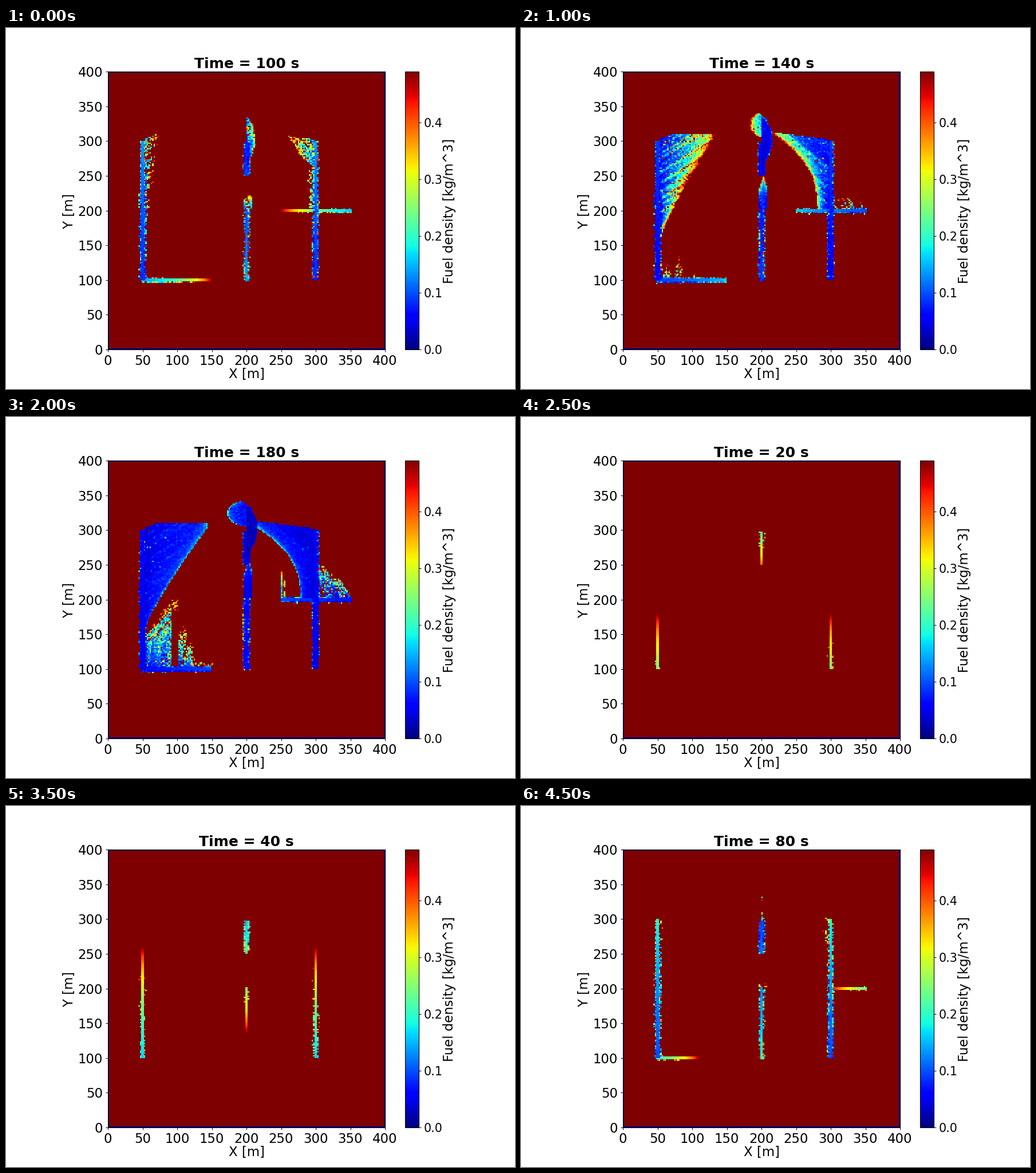
Animation, 889 px wide and 630 px high, one loop 5 s. Source, as a matplotlib script:

```python
import numpy as np
import matplotlib.pyplot as plt
from matplotlib.animation import FuncAnimation

W, H, DPI = 889, 630, 100
FULL = 0.49
rng = np.random.default_rng(14)

c = np.arange(1, 400, 2.0)
X, Y = np.meshgrid(c, c)
layers = []  # (ignition time, burn time scale)


def add(T, tau, vary=0.15):
    layers.append((T, tau * np.exp(rng.normal(0, vary, X.shape))))


def part(v, lo, hi):
    """Position of v between lo and hi, held to 0..1."""
    return np.clip((v - lo) / (hi - lo), 0, 1)


def line(along, across, start, end, centre, t0, speed, delays):
    """Drip-torch line, two cells wide, with ragged rows beside it."""
    lit = t0 + np.abs(along - start) / speed
    on = (along > min(start, end)) & (along < max(start, end))
    off = across - centre
    add(np.where(on & (np.abs(off) < 2), lit, np.inf), 20, 0.04)
    for pos, delay in delays.items():
        wait = 4 + rng.gamma(2, delay / 2, X.shape)
        add(np.where(on & (np.abs(off - pos) < 1), lit + wait, np.inf), 12, 0.25)


def streaks(s, step=3.2):
    n = int(1200 / step)
    return np.interp(s, np.arange(n) * step - 400, rng.random(n)) ** 2


def spread(d, reach, t0, t1, power, rough, s, ok=True, edge=0.1, tau=8):
    """Fire that covers the distance reach between t0 and t1, then creeps on.

    Streaks along lines of equal s lag behind, most of all near the start.
    """
    r = np.maximum(d, 0) / np.maximum(reach, 0.1)
    T = t0 + (t1 - t0) * r ** power + 130 * np.maximum(r - 1, 0)
    lag = streaks(s) + 0.3 * rng.exponential(1, X.shape)
    T = T + rough * np.maximum(1 - r, edge) * lag
    add(np.where(ok & (d > 0) & (r < 1.12), T, np.inf), tau)


# ignition lines
line(Y, X, 100, 300, 50, 0, 4, {-3: 36, 3: 34, 5: 90, -5: 300})
line(Y, X, 100, 300, 300, 0, 4, {-3: 34, 3: 36, -5: 100, 5: 250})
line(Y, X, 298, 250, 200, -4, 2.5, {-3: 34, 3: 24, -5: 200, 5: 90})
line(Y, X, 202, 98, 200, 20, 3.3, {-3: 50, 3: 45, -5: 250, 5: 120})
line(X, Y, 48, 151, 100, 49, 2, {-3: 18, 3: 60, -5: 500})
line(X, Y, 352, 250, 200, 58, 2.45, {-3: 18, 3: 60, -5: 500})

# large fans drawn from the outer lines toward the head
spread(X - 54, 80 * part(Y, 158, 303) ** 1.2, 64, 140, 0.65, 42, Y - 0.6 * X,
       ok=Y < np.minimum(311, 301 + 0.4 * (X - 48)))
spread(298 - X, 18 + 66 * part(Y, 200, 310) ** 2.6, 66, 140, 1.2, 38,
       Y + 0.8 * X, ok=(Y > 202) & (Y < 302 + 0.13 * (300 - X)))

# plumes rising from the two cross lines
bend = np.where(Y < 140, X - 0.15 * Y, 0.9 * X - Y + 130)
spread(Y - 102, 56 + 1.65 * (X - 54), 90 + 0.35 * (X - 54), 188, 1, 60, bend,
       ok=(X > 54) & (X < 92), edge=0.5)
spread(Y - 102, 11 + 117 * part(X, 151, 101) ** 1.7, 122, 196, 0.65, 70,
       X - 0.2 * Y, ok=(X > 101) & (X < 152), edge=0.25)
spread(Y - 202, 5 + 40 * (1 - part(X, 304, 352) ** 1.7), 92, 165, 0.8, 105,
       X + 0.5 * Y, ok=(X > 304) & (X < 353), edge=0.35)
spread(Y - 202, 56, 136, 190, 1, 45, X, ok=(X > 250) & (X < 257), edge=0.4)
meet = 172 + 0.75 * np.abs(Y - 193) + rng.exponential(7, X.shape)
add(np.where((X > 92) & (X < 102) & (Y < 226), meet, np.inf), 10)

# middle line: head, its tongue, and the plume closing the gap
spread(X - 200, 15 * np.sin(np.pi * part(Y, 248, 336) ** 1.5), 55, 98, 1, 30,
       X + Y, edge=0.3, tau=5)
spread(209 - X, 33 * np.sqrt(1 - part(np.abs(Y - 324), 0, 20) ** 2),
       102, 145, 1, 15, X + Y, ok=Y < 344 - 0.7 * (X - 190), edge=0.4)
spread(Y - 202, 50 - 3 * np.abs(X - 203), 68, 140, 1.2, 30, X,
       ok=(X > 196) & (X < 208), edge=0.2)


def backing(base, lo, hi, depth):
    """Slow lens-shaped burn on the left side of a line."""
    spread(base - X, depth * np.sin(np.pi * part(Y, lo, hi)), 162, 194, 1, 25,
           Y, edge=0.4)


backing(196, 115, 203, 6)
backing(196, 205, 265, 5)
backing(298, 125, 199, 10)

rim = (X < 2) | (X > 398) | (Y < 2) | (Y > 398)


def fuel(t):
    left = np.ones(X.shape)
    for T, tau in layers:
        left = np.minimum(left, 1 / (1 + np.maximum(t - T, 0) / tau))
    return np.where(rim, 0, FULL * left)


def px(p):
    return p * 72 / DPI


plt.rcParams["font.family"] = "DejaVu Sans"
fig = plt.figure(figsize=(W / DPI, H / DPI), dpi=DPI, facecolor="white")


def panel(x, w):
    return fig.add_axes([x / W, 69 / H, w / W, 485 / H])


ax = panel(178, 484)
img = ax.imshow(fuel(100), origin="lower", extent=(0, 400, 0, 400), cmap="jet",
                vmin=0, vmax=FULL, interpolation="nearest", aspect="auto")
ax.set_xticks(range(0, 401, 50))
ax.set_yticks(range(0, 401, 50))
ax.tick_params(labelsize=px(22.8), length=px(4.2), width=px(1), pad=px(4.6))

bar = fig.colorbar(img, cax=panel(697, 24), ticks=np.arange(5) / 10)
bar.ax.tick_params(labelsize=px(20.8), length=px(4.2), width=px(1), pad=px(4.5))


def label(x, y, s, size=22.8, **kw):
    return fig.text(x / W, 1 - y / H, s, fontsize=px(size), ha="center", **kw)


label(420, 610.5, "X [m]", va="baseline")
label(111, 319, "Y [m]", va="center", rotation=90)
label(775, 319, "Fuel density [kg/m^3]", va="center", rotation=90)
title = label(420.3, 69.5, "", 25, va="baseline", weight="bold")

# snapshots play in alphabetical order of their time
times = sorted(range(20, 201, 20), key=str)


def draw(i):
    t = times[i]
    img.set_data(fuel(t))
    title.set_text(f"Time = {t} s")
    return img, title


anim = FuncAnimation(fig, draw, frames=len(times), interval=500, repeat=True)
plt.show()
```
